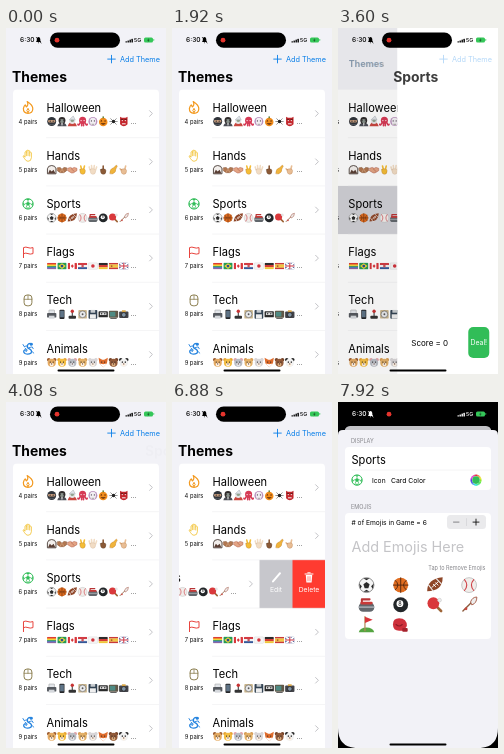
These frames come from a looping animation (160x346 px, 8 s). An HTML page:

```html
<!DOCTYPE html>
<html lang="en">
<head>
<meta charset="utf-8">
<title>Themes</title>
<style>
  html, body { margin: 0; width: 100%; height: 100%; overflow: hidden; background: #000; }
  svg { display: block; width: 100%; height: 100%; }
  text { font-family: Inter, Roboto, "Liberation Sans", sans-serif; }
</style>
</head>
<body>
<svg id="stage" viewBox="0 0 160 346" xmlns="http://www.w3.org/2000/svg"></svg>
<script>
const BLUE = '#087ee8', GREEN = '#31bd58', PAPER = '#f2f2f7', RULE = '#e6e6e9', TOP = 61.5, PITCH = 48.2;

// Markup helpers
const disc = (x, y, r, fill, stroke = 'none', w = 1) =>
  `<circle cx="${x}" cy="${y}" r="${r}" fill="${fill}" stroke="${stroke}" stroke-width="${w}"/>`;
const box = (x, y, w, h, fill, rx = 0, more = '') =>
  `<rect x="${x}" y="${y}" width="${w}" height="${h}" rx="${rx}" fill="${fill}" ${more}/>`;
const path = (d, fill = 'none', stroke = 'none', w = 1) =>
  `<path d="${d}" fill="${fill}" stroke="${stroke}" stroke-width="${w}" stroke-linecap="round" stroke-linejoin="round"/>`;
const line = (d, stroke, w = 1) => path(d, 'none', stroke, w);
const text = (x, y, size, str, fill = '#000', more = '') =>
  `<text x="${x}" y="${y}" font-size="${size}" fill="${fill}" ${more}>${str}</text>`;
const at = (x, y, s, body) => `<g transform="translate(${x} ${y}) scale(${s})">${body}</g>`;
const group = (id, body, more = '') => `<g id="${id}" ${more}>${body}</g>`;
const MID = 'text-anchor="middle"', END = 'text-anchor="end"', BOLD = 'font-weight="700"';

// Small pictures, each about ten units wide around the origin
const eyes = (y = -.5, fill = '#222') => disc(-1.6, y, .65, fill) + disc(1.6, y, .65, fill);
const face = (skin, ear, snout = '#fff3e4') =>
  disc(-3.2, -3, 1.9, ear) + disc(3.2, -3, 1.9, ear) + disc(0, .4, 4.4, skin) +
  disc(0, 2.2, 2, snout) + eyes() + disc(0, 1.5, .6, '#422');
const figure = (hair, skin, coat) =>
  path('M-5 5Q-4 1 0 1Q4 1 5 5Z', coat) + disc(0, -1.2, 3.7, hair) + disc(0, -.5, 2.3, skin) + eyes(-.8);
const flag = (body) => `<g clip-path="url(#flagClip)">${body}</g>`;
const bands = (colors, upright) => flag(colors.map((f, i) => {
  const n = colors.length;
  return upright ? box(-5 + i * 10 / n, -3.5, 10 / n + .1, 7, f) : box(-5, -3.5 + i * 7 / n, 10, 7 / n + .1, f);
}).join(''));
const hand = (skin, fingers, edge = '#a9652f') =>
  line(fingers, skin, 1.7) + path('M-3 0Q-3-1 0-1Q3-1 3 1Q3 5 0 5Q-3 5-3 0Z', skin, edge, .3);

const rows = [
  ['Halloween', [
    disc(0, 0, 4.8, '#30343a') + box(-4, -1.6, 8, 2.6, '#c39a7c', 1.2) + eyes(-.3) + line('M-3 3Q0 4 3 3', '#6c737c', .6),
    figure('#2f2b2b', '#8a938d', '#4b4d55') + path('M-1 2L0 5L1 2Z', '#e8e8e8'),
    path('M-5 5Q-3 0 0 0Q3 0 5 5Z', '#c9473f') + disc(0, -.6, 3.2, '#e4e4e6') + disc(0, -1.2, 1.8, '#93a58c') + path('M-3-2L1-6L3-2Z', '#dfe3e8', '#8d939c', .4),
    disc(0, -1.2, 3.8, '#d63a55') + line('M-3 2Q-4 5-5 3M-1 2V4.5M1 2V4.5M3 2Q4 5 5 3', '#d63a55', 1.7) + eyes(-1, '#fff'),
    disc(0, 0, 4.8, '#b98fbd') + path('M-3.2 1Q-4-4 0-4Q4-4 3.2 1L2 4H-2Z', '#f1eef2') + eyes(-.6, '#443a4a') + line('M-1 3H1', '#665', .6),
    disc(0, .5, 4.6, '#f08c1c') + box(-.7, -5.5, 1.4, 2, '#527329') + path('M-3 0L-1 0L-2-2ZM1 0L3 0L2-2ZM-3 2Q0 5 3 2Z', '#5c2b0a'),
    line('M-3-3L3 3M3-3L-3 3M-4 0H4', '#444', .6) + disc(0, 0, 1.8, '#222'),
    path('M-4-5L-2-4H2L4-5L4 3Q0 7-4 3Z', '#c3262c') + eyes(-1, '#fff') + box(-2, 2, 4, 1, '#fff') + line('M-3-2.4L-1-2M3-2.4L1-2', '#4c1512', .8)
  ]],
  ['Hands', [
    path('M-4.6 4V-1Q-4-4.5 0-4.5Q4-4.5 4.6-1V4Z', '#f3efec', '#3c302b', .9) + path('M-4 4L-2 0L0 2L2 0L4 4Z', '#5b4036'),
    path('M-5-2L-2-2.5L0-.5L2-2.5L5-2V1L2 3.2H-2L-5 1Z', '#b27750', '#7c4a2c', .5) + line('M-2 3L-.5 0M2 3L.5 0', '#e0b896', .6),
    path('M-5-1.5L-2-2.5L0-1.5L2-2.5L5-1.5V1L1 3.5H-1L-5 1Z', '#e3a484', '#ad5a48', .5) + line('M-1-1L2 1.8', '#ad5a48', .6),
    hand('#f4bd36', 'M-1 0L-2-4M1 0L2-4'),
    hand('#f1dcc4', 'M-3 0L-4-3M-1 0L-1.5-4.5M1 0L1.5-4.5M3 0L4-3', '#c9a98a'),
    hand('#8b5a37', 'M0 0V-4', '#4d2f1b'),
    path('M-4 4Q-4-1 0-2L3-5L4.2-4L2.5-.5Q3 3-1 4.5Z', '#f0b43c', '#a9652f', .3),
    hand('#e8bd94', 'M-2 1L-4-1M1 0L2-4')
  ]],
  ['Sports', [
    disc(0, 0, 4.8, '#f4f4f4', '#555', .4) + path('M0-2L2-.5L1.2 2H-1.2L-2-.5ZM-2-4.4L2-4.4L0-3.1ZM4.7-1L4 2.5L3 .8ZM-4.7-1L-4 2.5L-3 .8ZM-2 4.3L0 3L2 4.3Z', '#292929'),
    disc(0, 0, 4.8, '#e06d20') + line('M-4.7 0H4.7M0-4.7V4.7M-3.5-3Q0 0-3.5 3M3.5-3Q0 0 3.5 3', '#54270e', .6),
    path('M-5 4Q-5-4 5-5Q5 4-5 4Z', '#8e4628') + line('M-2 1.5L2-2M-1-.5L.5 1M.5-1.5L2 0', '#fff', .6) + line('M-4 0L-1 4M1-4L4-1', '#eee', .7),
    disc(0, 0, 4.8, '#f1eeeb', '#aaa', .4) + line('M-3-3.5Q0 0-3 3.5M3-3.5Q0 0 3 3.5', '#cf4147', .7),
    path('M-3-1V-3.5H2', 'none', '#b73334', 1.3) + box(-5, -1.5, 10, 6, '#62676c', 2.8) + box(-4, -2, 8, 1.8, '#c83a38', .9) + box(-5, 1, 10, 1, '#a5abb0'),
    disc(0, 0, 4.8, '#222629') + disc(-.5, -.7, 2.2, '#fff') + text(-.5, .6, 3.6, '8', '#111', MID),
    line('M1 1L4 4', '#9e6538', 1.7) + disc(-1, -1, 3.8, '#d9383b') + disc(3, -3, 1.2, '#eee', '#bbb', .3),
    line('M-4 4L2-2', '#8b5a3c', .9) + path('M1-2Q2-5 5-5Q5-1 2 0Z', '#eee', '#a65d4a', .6) + disc(-2, 2.6, .9, '#c8463e')
  ]],
  ['Flags', [
    bands(['#dc3636', '#f08b2e', '#f2d43b', '#339657', '#3b64b8', '#7b448d']),
    flag(box(-5, -4, 10, 8, '#259a55') + path('M-4 0L0-3L4 0L0 3Z', '#f1d33b') + disc(0, 0, 1.5, '#264a95')),
    bands(['#d8363b', '#fff', '#fff', '#d8363b'], true) + path('M0-2L1.6 0L0 2L-1.6 0Z', '#d8363b'),
    bands(['#d23b43', '#f1f1f1', '#345798']) + disc(0, 0, 1.4, '#c9545a'),
    bands(['#f4f4f4', '#f4f4f4']) + disc(0, 0, 1.9, '#d2333c') + box(-5, -3.5, 10, 7, 'none', 1, 'stroke="#ccc" stroke-width=".4"'),
    bands(['#2d2b2b', '#d63b34', '#efc73a']),
    bands(['#c9393b', '#f0c43b', '#f0c43b', '#c9393b']) + disc(-2, 0, 1, '#a75134'),
    flag(box(-5, -4, 10, 8, '#30498b') + line('M-5-4L5 4M5-4L-5 4M0-4V4M-5 0H5', '#fff', 2) + line('M0-4V4M-5 0H5', '#ce3544', 1.1))
  ]],
  ['Tech', [
    box(-3, -4.6, 6, 4, '#e3e6ea', .5, 'stroke="#777" stroke-width=".4"') + box(-5, -1.5, 10, 5, '#55595f', 1) + box(-3, 1.5, 6, 3.2, '#d5d8dc'),
    box(-2.7, -5, 5.4, 10, '#252628', 1) + box(-2, -3.8, 4, 7, '#5f7487'),
    line('M0 2V-3', '#444', 1.2) + disc(0, -3.3, 1.8, '#c73333') + box(-4, 1.5, 8, 3.3, '#333', 1),
    box(-4.6, -4.6, 9.2, 9.2, '#c9b48b', 1) + disc(0, 0, 3.6, '#e9eaec', '#555', .6) + disc(0, 0, 1, '#555'),
    box(-4.7, -4.7, 9.4, 9.4, '#334353', 1) + box(-2.5, -4.7, 5, 3, '#c8ccd0') + box(-3.2, 0, 6.4, 4.7, '#eee'),
    box(-5, -3.3, 10, 6.6, '#292929', .8) + box(-3.5, -2, 7, 2.8, '#ddd') + disc(-1.7, -.6, .8, '#333') + disc(1.7, -.6, .8, '#333'),
    box(-5, -3.7, 10, 7.4, '#615848', 1) + box(-4, -2.6, 6, 5, '#4e8a83') + line('M-3 4.5H3', '#555'),
    box(-5, -3, 10, 7, '#424349', 1) + box(-2, -4.3, 4, 2, '#d9a441') + disc(0, .6, 2.5, '#8295a6', '#222', .8)
  ]],
  ['Animals', [
    face('#e4aa63', '#99592e'), face('#f3bd43', '#e5a02f'), face('#b9bdc4', '#e0a1a8', '#e5e5e7'),
    face('#e3b067', '#d69c54'),
    path('M-3 0L-4-5L-1-3ZM3 0L4-5L1-3Z', '#d8d5d7') + face('#d8d5d7', '#d8d5d7'),
    path('M-5-5L-1-3H1L5-5L4 1L0 5L-4 1Z', '#df6c2c') + path('M-4 1L0 5L4 1L0 2Z', '#fff') + eyes(),
    face('#925a39', '#744126', '#d7ab7c'), face('#f1f1f1', '#222') + eyes(-.5)
  ]]
];
const extras = [
  path('M-5 5Q-4 2 0 2Q4 2 5 5Z', '#55a541') + line('M-1 4V-5', '#b28a59', .8) + path('M-1-5L4-3L-1-1Z', '#d9353a'),
  path('M-5 0Q-5-4-1-4Q4-4 4 1L2 4H-1Q-5 4-5 0Z', '#ce303b') + line('M-3 0Q-1 2 1 0', '#8f1c27', .7) + box(1, 2.3, 3.5, 2.4, '#a5222d', .6)
];

const ballIcon = disc(0, 0, 5.2, '#fff', GREEN, 1) +
  path('M0-2.1L2-.6L1.2 1.7H-1.2L-2-.6ZM-2.3-4.8H2.3L0-3.4ZM5-1.6L4.5 2.5L3.2.4ZM-5-1.6L-4.5 2.5L-3.2.4ZM-2 4.7L0 3.4L2 4.7Z', GREEN) +
  line('M0-2V-3.5M2-.6L3.3.4M1.2 1.7L2 4M-1.2 1.7L-2 4M-2-.6L-3.3.4', GREEN, .7);
const icons = [
  line('M-.8-6Q5-2.5 4.8 1.5Q4.5 5.8 0 5.8Q-4.8 5.5-4.6 1Q-4-1.6-2.8-2.6L-1.6-.6Q.8-2.5-.8-6Z', '#f39a20', 1.2) +
    line('M0 5Q-2.6 3.6 0 .8Q2.6 3.6 0 5Z', '#f39a20', 1),
  line('M-3 1V-3.6Q-2.3-4.7-1.6-3.6V0M-1.6-3.6V-5Q-.8-6.2 0-5V0M0-5Q.9-6 1.7-4.8V.3M1.7-3Q2.7-4.2 3.4-3V2Q3.2 5.6 0 5.6Q-2 5.5-3.4 3L-5 .5Q-4.5-.8-3 1', '#f0bd20', .75),
  ballIcon,
  line('M-4.5 5.5V-4.5Q-2-5.5 0-4.5Q2-3.5 5-4.5V1.5Q2 2.5 0 1.5Q-2 .5-4.5 1.5', '#e8443e', 1),
  box(-3.9, -5.3, 7.8, 10.8, 'none', 3, 'stroke="#8d8052" stroke-width="1"') + line('M-3.9-1H3.9M0-5V-1', '#8d8052', .8),
  line('M4-4.6Q1-6-.5-3.4Q-1.4-.6 1.4.4Q4.6 2 3 4.6Q0 6.4-3 5Q-5.4 3-3.4 1.4Q-1.6 1-1.8 2.8', '#2684df', 1.3) +
    line('M-1-2.6L-4-2L-5-4M1.4-1L4.2-1.6L5.2.2M-.6 1.6L-3-.4M4 3L5.8 4.6', '#2684df', .9) + disc(3.2, -4.2, 1.5, '#2684df')
];

const strip = (list) => list.map((e, j) => at(45.7 + j * 10.3, 32, .93, e)).join('') +
  text(124.5, 34, 7, '...', '#222');
const rowBody = (i) => {
  const [name, list] = rows[i];
  return at(22, 18, 1, icons[i]) + text(22, 34, 5.8, `${i + 4} pairs`, '#111', MID) +
    text(40.5, 22, 11.1, name) + strip(list) + line('M143.6 21.2L146.4 24L143.6 26.8', '#c3c3c7', 1);
};
const action = (id, fill, label, icon) =>
  group(id, box(0, 0, 66, PITCH, fill) + group(id + 'Label', at(0, 17.5, 1, icon) + text(0, 32, 6.8, label, '#fff', MID)));
const sportsRow = box(7, 0, 146, PITCH, '#fff') +
  group('rowMove', box(7, 0, 146, PITCH, '#d1d1d6', 0, 'id="tint"') + rowBody(2)) +
  group('actions',
    action('edit', '#c7c7cc', 'Edit', line('M-3 4L3-3', '#fff', 2) + line('M3.7-3.8L4-4.2', '#fff', 2)) +
    action('trash', '#ff3b30', 'Delete', path('M-3.2-2.5H3.2L2.6 5.2H-2.6Z', '#fff') + line('M-4-3.4H4M-1.2-4.6H1.2', '#fff', 1) + line('M-1-.8V3.5M1-.8V3.5', '#ff3b30', .6)));

const listView = box(0, 0, 210, 346, PAPER) +
  `<g clip-path="url(#card)">` + box(7, TOP, 146, 300, '#fff') +
  rows.map((r, i) => at(0, TOP + i * PITCH, 1, (i === 2 ? sportsRow : rowBody(i)) +
    (i ? line('M40.5 0H153', RULE, .4) : ''))).join('') + '</g>';

const gameView = box(0, 0, 160, 346, '#fff') + text(14, 317.8, 8, 'Score = 0') +
  box(71, 299, 21, 31, GREEN, 5) + text(81.5, 317, 6.9, 'Deal!', '#fff', MID) +
  text(148, 317.8, 8, 'Shuffle', BLUE, END);

const nav = group('add', line('M105.5 27.3V34.9M101.7 31.1H109.3', BLUE, .9) + text(154, 33.7, 7.3, 'Add Theme', BLUE, END)) +
  group('chevron', line('M8 27L4.5 31L8 35', BLUE, 1.2)) +
  text(0, 0, 7, 'Themes', BLUE, 'id="back"') + text(0, 0, 7, 'Themes', '#000', `id="heading" ${BOLD}`) +
  text(6, 54.4, 13.9, 'Sports', '#000', `id="gameTitle" ${BOLD}`);

const sheet = path('M0 346V33Q0 28 5 28H155Q160 28 160 33V326Q160 346 140 346H20Q0 346 0 326Z', PAPER) +
  text(13, 41, 5.5, 'DISPLAY', '#85858a') + box(7, 45, 146, 43, '#fff', 4) +
  text(13.5, 61.5, 11.1, 'Sports') + line('M14 68H153', RULE, .4) +
  at(19, 78, 1, ballIcon) + text(34, 80.5, 6.7, 'Icon') + text(53, 80.5, 6.8, 'Card Color') +
  [...Array(24)].map((_, i) => `<path d="M0-4.8A4.8 4.8 0 0 1 1.3-4.6" transform="translate(138 78) rotate(${i * 15})" fill="none" stroke="hsl(${i * 15} 80% 55%)" stroke-width="1.5"/>`).join('') +
  disc(138, 78, 3.8, GREEN) +
  text(13, 107, 5.5, 'EMOJIS', '#85858a') + box(7, 111, 146, 126, '#fff', 4) +
  text(13.5, 122.5, 6.7, '# of Emojis in Game = 6') + box(109, 113, 39, 14, '#eaeaec', 3.5) +
  line('M115.5 120H121', '#77777b', .9) + line('M128.5 116.5V123.5', '#c9c9cd', .5) + line('M135 120H141M138 117V123', '#111', .9) +
  text(13.5, 149.5, 14.4, 'Add Emojis Here', '#c4c4c7') +
  text(147.5, 168, 5.5, 'Tap to Remove Emojis', '#85858a', END) +
  [...rows[2][1], ...extras].map((e, i) => at(28.5 + (i % 4) * 34.2, 183 + Math.floor(i / 4) * 19.7, 1.55, e)).join('');

const status = `<g id="status" fill="#000">` + text(14, 14.4, 6.6, '6:30', 'inherit', 'font-weight="500"') +
  `<path d="M30 14H35L34.3 12.5V11Q34 9 32.5 9Q31 9 30.8 11V12.5ZM31.8 14.6H33.2L32.5 15.4Z"/>` +
  `<path d="M30 9L35.3 15.3" stroke="currentColor" stroke-width=".7"/>` +
  [0, 1, 2, 3].map(i => box(119.5 + i * 2, 13.2 - i * .8, 1.4, 1.4 + i * .8, 'inherit', .4)).join('') +
  text(128, 14.2, 5.4, '5G', 'inherit', 'font-weight="500"') + '</g>' +
  box(138, 9.4, 9, 5.2, '#35c759', 1.5) + box(147.4, 11, .8, 2, '#35c759', .4) +
  at(0, 12.5, .65, path('M220-4L217 0H219L218 3L221-1H219Z', '#174f25')) +
  box(44, 4.6, 70, 15.2, '#000', 7.6) + disc(51, 12.2, 2.4, '#e5342d');

const $ = (id) => document.getElementById(id);
$('stage').innerHTML = `<defs>
  <clipPath id="card"><rect x="7" y="${TOP}" width="146" height="320" rx="4"/></clipPath>
  <clipPath id="flagClip"><rect x="-5" y="-3.5" width="10" height="7" rx="1"/></clipPath>
  <clipPath id="screen"><rect id="screenBox" width="160" height="346"/></clipPath></defs>` +
  box(0, 0, 160, 346, '#000') +
  group('base', `<g clip-path="url(#screen)">` + group('list', listView) +
    box(0, 0, 160, 346, '#000', 0, 'id="dim"') + group('game', gameView) + nav +
    box(0, 0, 160, 346, '#000', 0, 'id="shade"') + '</g>') +
  group('sheet', sheet) + status + box(51.5, 341.5, 57, 2, '#000', 1);

const clamp = (v) => Math.max(0, Math.min(1, v));
const mix = (a, b, k) => a + (b - a) * k;
const spring = (ms, rate = 18.2) => {
  const x = Math.max(0, ms) / 1000 * rate;
  return 1 - (1 + x) * Math.exp(-x);
};
const easeOut = (k) => 1 - (1 - clamp(k)) ** 3;
const set = (id, attrs) => { for (const k in attrs) $(id).setAttribute(k, attrs[k]); };
const move = (id, x, y = 0) => set(id, { transform: `translate(${x} ${y})` });

function drawPush(q) {
  move('list', -48 * q);
  move('game', 160 * (1 - q));
  set('dim', { opacity: .08 * q });
  set('add', { opacity: (1 - q) ** 1.2 });
  set('chevron', { opacity: clamp(q * 4 - 3) });
  set('gameTitle', { x: 6 + 133 * (1 - q), opacity: q ** .6 });
  const k = (1 - q) ** 1.3;
  const place = { x: mix(12.7, 6, k), y: mix(33.5, 54.4, k), 'font-size': mix(7.1, 13.9, k) };
  set('back', { ...place, opacity: q ** 3 });
  set('heading', { ...place, opacity: k });
}

function drawSwipe(open) {
  const off = 66 * open, half = off / 2;
  move('rowMove', -off);
  move('edit', 153.5 - off);
  move('trash', 153.5 - half);
  for (const id of ['edit', 'trash']) {
    move(id + 'Label', half / 2);
    set(id + 'Label', { opacity: clamp(open * 2 - 1) });
  }
  set('actions', { visibility: off > .2 ? 'visible' : 'hidden' });
}

function drawSheet(p) {
  const s = 1 - .083 * p;
  set('base', { transform: `translate(${80 * (1 - s)} ${24 * p}) scale(${s})` });
  set('screenBox', { rx: p > 0 ? mix(20, 6, p) : 0 });
  set('shade', { opacity: .2 * p });
  move('sheet', 0, 320 * (1 - p));
  const ink = p > .4 ? '#fff' : '#000';
  set('status', { fill: ink, color: ink });
}

function draw(t) {
  drawPush(t < 3530 ? spring(t - 1930) : 1 - spring(t - 3530));
  set('tint', { opacity: t < 1925 ? 0 : clamp(1 - (t - 3650) / 350) });
  drawSwipe(t < 7250 ? easeOut((t - 6300) / 450) : 1 - easeOut((t - 7250) / 300));
  drawSheet(spring(t - 7260, 16));
}

const start = performance.now();
function tick() {
  draw((performance.now() - start) % 8000);
  requestAnimationFrame(tick);
}
tick();
</script>
</body>
</html>
```
